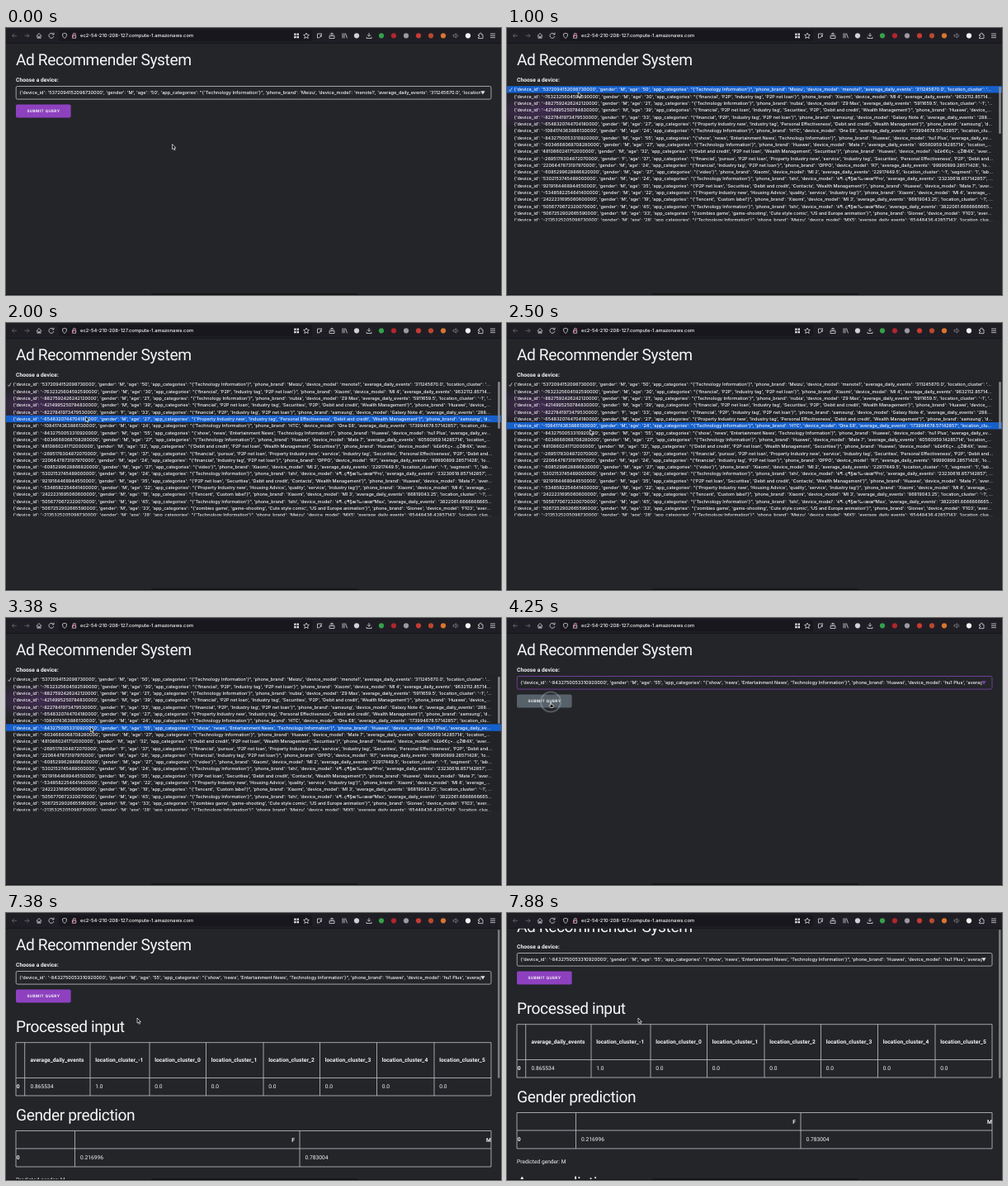
Write an HTML page that moves like this. It is 600 px wide and 323 px high and loops after 8 s.

```html
<!DOCTYPE html>
<html lang="en">
<head>
<meta charset="utf-8">
<title>Ad Recommender System</title>
<style>
  html, body { margin: 0; height: 100%; overflow: hidden; background: #232529; }
  svg { display: block; }
  text { font-family: Roboto, sans-serif; fill: #f6f6f6; text-rendering: geometricPrecision; white-space: pre; }
  .ui { font-family: Inter, sans-serif; font-weight: 500; }
  .h1 { letter-spacing: -.42px; }
  .b { font-weight: 700; letter-spacing: .06px; }
  .btn { font: 700 4.58px Inter, sans-serif; letter-spacing: .42px; }
  .line { fill: none; stroke: #c4c5c8; stroke-width: .8; }
  .icon { fill: none; stroke: #d8d8de; stroke-width: .8; }
</style>
</head>
<body>
<script>
const LOOP = 8000, STEP = 125;
const OPEN = 1000, PICK = 3500, CLICK = 4250, RESULT = 6500;
const ROW_TOP = 70.2, ROW_H = 8.32, PICKED = 7;

// id; gender; age; categories; brand; model; daily events
const devices = `5372094152098730000;M;50;Technology Information;Meizu;menote1;311245670.0
-7632325604592590000;M;30;financial|P2P|Industry tag|P2P net loan;Xiaomi;MI 4;9632112.857142857
-8827592426242120000;M;21;Technology Information;nubia;Z9 Max;5911659.5
-4214995250784830000;M;39;financial|P2P net loan|Industry tag|Securities|P2P|Debit and credit|Wealth Management;Huawei;Mate 7;0.0
-8227841973479530000;F;33;financial|P2P|Industry tag|P2P net loan;samsung;Galaxy Note 4;2882.5
-6548320744704180000;M;27;Property Industry new|Industry tag|Personal Effectiveness|Debit and credit|Wealth Management;samsung;Note 3;0.0
-1084174363886130000;M;24;Technology Information;HTC;One E8;173994678.57142857
-8432750053310920000;M;55;show|news|Entertainment News|Technology Information;Huawei;hu1 Plus;0.0
-6034668068708280000;M;27;Technology Information;Huawei;Mate 7;40560959.14285714
4810860241712000000;M;32;Debit and credit|P2P net loan|Wealth Management|Securities;Huawei;è£è€€ç•…çŽ©4X;0.0
-2695178304872070000;F;37;financial|pursue|P2P net loan|Property Industry new|service|Industry tag|Securities|Personal Effectiveness|P2P|Debit and credit;Huawei;P8;0.0
2206447873197970000;M;24;financial|Industry tag|P2P net loan;OPPO;R7;99990899.28571428
-6085299628866820000;M;27;video;Xiaomi;MI 2;22917449.5
5302153745489000000;M;24;Technology Information;Ishi;é¶..ç¶§æ‰‹æœºPro;23230618.857142857
9219164468944550000;M;35;P2P net loan|Securities|Debit and credit|Contacts|Wealth Management;Huawei;Mate 7;0.0
-5348582254641400000;M;22;Property Industry new|Housing Advice|quality|service|Industry tag;Xiaomi;MI 4;0.0
2422231695060600000;M;19;Tencent|Custom label;Xiaomi;MI 3;86819043.25
5056770672320070000;M;45;Technology Information;Ishi;é¶..ç¶§æ‰‹æœºMax;3822061.6666666665
5067252902665590000;M;33;zombies game|game-shooting|Cute style comic|US and Europe animation;Gionee;F103;0.0
-2135325205098730000;M;28;Technology Information;Meizu;MX5;65448436.42857143`.split('\n').map(line => {
  const [id, gender, age, cats, brand, model, events] = line.split(';');
  const set = cats.split('|').map(c => `'${c}'`).join(', ');
  return `{'device_id': '${id}', 'gender': '${gender}', 'age': '${age}', 'app_categories': "{${set}}", ` +
    `'phone_brand': '${brand}', 'device_model': '${model}', 'average_daily_events': '${events}', ` +
    `'location_cluster': '-1', 'segment': '1', 'label': '1'}`;
});

// y is the middle of the capitals
const text = (x, y, s, size = 6.67, cls = '', more = '') =>
  `<text x="${x}" y="${y + size * .357}" font-size="${size}" class="${cls}" ${more}>${s}</text>`;
const rect = (x, y, w, h, fill, more = '') =>
  `<rect x="${x}" y="${y}" width="${w}" height="${h}" fill="${fill}" ${more}/>`;
const path = (d, more = '') => `<path d="${d}" ${more}/>`;
const dot = (x, y, r, fill) => `<circle cx="${x}" cy="${y}" r="${r}" fill="${fill}"/>`;

const table = (cols, rows) => {
  const [x0, x1] = [cols[0], cols.at(-1)], [y0, y1] = [rows[0], rows.at(-1)];
  return path(rows.map(y => `M${x0} ${y}H${x1}`).join('') + cols.map(x => `M${x} ${y0}V${y1}`).join(''), 'class="line"');
};

const clusterCols = [102, 174, 242.5, 312, 380.5, 449.5, 519];
const results =
  text(12, 136.7, 'Processed input', 19.2, 'h1') +
  table([12, 22.7, ...clusterCols, 588], [156.7, 199.5, 221]) +
  text(29.5, 178, 'average_daily_events', 6.67, 'b') +
  text(12.7, 210, '0', 6.67, 'b') + text(29.5, 210, '0.865534') +
  clusterCols.map((x, i) => text(x + 6.2, 178, `location_cluster_${i - 1}`, 6.67, 'b') +
    text(x + 6.2, 210, i ? '0.0' : '1.0')).join('') +
  text(12, 243.7, 'Gender prediction', 19.2, 'h1') +
  table([12, 83.5, 356, 588], [263.5, 285, 307]) +
  text(350, 274.5, 'F', 6.67, 'b', 'text-anchor="end"') +
  text(588, 274.5, 'M', 6.67, 'b', 'text-anchor="end"') +
  text(12.7, 296, '0', 6.67, 'b') + text(90, 296, '0.216996') + text(362.5, 296, '0.783004') +
  text(12, 322.5, 'Predicted gender: M') +
  text(12, 348, 'Age prediction', 19.2, 'h1');

const toolbar = rect(0, 0, 600, 18.5, '#1f1e25') + rect(0, 18, 600, .6, '#0f0f13') +
  rect(64, 2.5, 307, 13.5, '#18171d', 'rx="1.7"') +
  text(90, 9.4, 'ec2-54-210-208-127.compute-1.amazonaws.com', 5.8, 'ui') +
  path('M13 9.3H7.5m2.5-2.5L7.5 9.3l2.5 2.5M22.5 9.3H28m-2.5-2.5L28 9.3l-2.5 2.5', 'class="icon" opacity=".4"') +
  path('M36.8 9.6L40 6.5l3.2 3.1M38 9v3.3h1.4v-2h1.2v2H42V9' +
    'M57.4 7.5a3 3 0 1 0 .5 2.5M58 5.6v2.3h-2.3' +
    'M71 6.2l2.6 1q0 4-2.6 5.4q-2.6-1.4-2.6-5.4z' +
    'M80.5 9h4.2v3.2h-4.2zM81.3 9V7.6a1.3 1.3 0 0 1 2.6 0V9' +
    'M364 6l1 2.2 2.4.2-1.8 1.6.6 2.5-2.2-1.3-2.2 1.3.6-2.5-1.8-1.6 2.4-.2z' +
    'M377.5 12V7h5.5l-2 2.5h2l-4 2.5z' +
    'M395 6v3.5M392.5 8l2.5-2 2.5 2M392 9.5v3h6v-3z' +
    'M408 6.3v6M410 6.3v6M411.5 6.5l2 5.8' +
    'M440 6v4.2m-2-2l2 2 2-2M437 10.8v1.7h6v-1.7' +
    'M572.5 8h1.5q0-2 1.3-2t1.3 2h1.4v4.6h-5.5v-1.4q1.6 0 1.6-1t-1.6-.9z' +
    'M587 7h6M587 9.3h6M587 11.6h6', 'class="icon"') +
  path('M80 12.6l5-6.4', 'stroke="#e23b55" stroke-width=".9"') +
  path('M349.2 6.4h2.4v2.4h-2.4zM352.6 6.4h2.4v2.4h-2.4zM349.2 9.8h2.4v2.4h-2.4zM352.6 9.8h2.4v2.4h-2.4z', 'fill="#e4e4e8"') +
  path('M542 8.3h1.5l2-1.7v5.4l-2-1.7H542zM547 7.5q1.4 1.8 0 3.6', 'class="icon" opacity=".5"') +
  [[425, '#d0d0d6'], [455, '#35a04a'], [470, '#b0262c'], [485, '#9a9aa0'], [500, '#c63a32'],
   [515, '#b8492f'], [530, '#d9752f'], [560, '#f4f4f4']].map(([x, c]) => dot(x, 9.3, 3.1, c)).join('');

document.body.innerHTML = `<svg width="600" height="323" viewBox="0 0 600 323">
  <defs><radialGradient id="glow"><stop stop-color="#7a3aa0" stop-opacity=".35"/><stop offset="1" stop-color="#7a3aa0" stop-opacity="0"/></radialGradient></defs>
  ${rect(0, 0, 600, 323, '#232529')}
  <g id="page">
    ${text(12, 37.7, 'Ad Recommender System', 19.2, 'h1')}
    ${text(12, 63, 'Choose a device:', 6.67, 'b')}
    ${rect(12.2, 70.5, 575.8, 15.6, 'none', 'id="box" stroke-width=".8" rx="1.7"')}
    <svg x="12" y="70" width="563.5" height="16">${text(4.2, 8.2, '', 5.57, 'ui', 'id="value"')}</svg>
    ${path('M575.4 76.2h5.2l-2.6 4.2z', 'id="arrow"')}
    ${rect(12, 92.6, 66.6, 15.9, '', 'id="button" rx="1.7"')}
    ${text(45.4, 100.6, 'SUBMIT QUERY', 4.58, 'btn', 'text-anchor="middle"')}
    <g id="results">${results}</g>
  </g>
  ${rect(596, 20, 2.6, 180, '#77787c', 'id="thumb" rx="1.3"')}
  ${rect(0, 322, 600, 1, '#17181b')}${rect(176, 321.4, 250, 1.6, '#101113')}
  ${toolbar}
  <svg id="menu" y="68.5" width="600" height="165" viewBox="0 68.5 600 165">
    ${rect(0, 68.5, 600, 165, '#222327')}
    <ellipse cx="38" cy="100" rx="75" ry="22" fill="url(#glow)"/>
    ${rect(0, 0, 600, ROW_H, '#1660cc', 'id="mark"')}
    ${path('M2.4 74.8l1.3 1.7 2.4-4', 'class="icon"')}
    ${devices.map((d, i) => text(8.5, ROW_TOP + ROW_H * (i + .5), d, 5.45, 'ui row')).join('')}
    ${rect(596.3, 71, 2.4, 57, '#8a8b8e', 'rx="1.2"')}
  </svg>
  <circle id="ring" r="12" fill="none" stroke="#b4bac0" stroke-opacity=".35" stroke-width="2"/>
  <g id="cursor" stroke="#f4f4f4" stroke-width=".7" fill="#111">
    ${path('M0 0V6.2L1.4 5L2.4 7.3L3.5 6.8L2.5 4.6H4.4z', 'id="pointer"')}
    ${path('M-.6 .4q.6-.8 1.2 0V3l2.3.6q.6.4.3 1.6L2.6 7H-.4L-2 4.6q0-.9 1.4 0z', 'id="hand"')}
  </g>
</svg>`;

const $ = id => document.getElementById(id);
const set = (id, attrs) => { for (const k in attrs) $(id).setAttribute(k, attrs[k]); };
const show = (id, on) => set(id, { visibility: on ? 'visible' : 'hidden' });

// Long options end in an ellipsis
for (const row of document.querySelectorAll('.row')) {
  let s = row.textContent;
  while (row.getComputedTextLength() > 581) row.textContent = (s = s.slice(0, -1)) + '...';
}

// time, x, y
const track = [[0, 201.5, 140.5], [880, 86, 77.5], [1250, 87, 77.8], [1375, 88, 80], [1625, 95, 112],
  [2000, 96.5, 113], [2630, 101, 131], [3500, 102.5, 131.5], [4125, 53, 101.5], [4375, 53, 101.5],
  [5500, 229, 140.5], [6500, 229, 140.5], [7250, 159, 127], [LOOP, 159, 127]];

function cursorAt(t) {
  const i = Math.max(1, track.findIndex(k => k[0] >= t));
  const [t0, x0, y0] = track[i - 1], [t1, x1, y1] = track[i];
  const u = (t - t0) / (t1 - t0), e = u * u * (3 - 2 * u);
  return [x0 + (x1 - x0) * e, y0 + (y1 - y0) * e];
}

function draw(now) {
  const t = Math.floor(now % LOOP / STEP) * STEP;
  const [x, y] = cursorAt(t);
  const focused = t >= OPEN - STEP && t <= CLICK;
  const loaded = t >= RESULT;
  const scroll = 22 * (Math.max(0, t - 7500) / 375) ** 2;
  // the highlight trails the pointer by one step
  const pointed = cursorAt(Math.max(OPEN, t - STEP))[1];
  const hovered = Math.max(0, Math.floor((pointed - ROW_TOP) / ROW_H));
  const overButton = t > 4000 && t < 4600;

  set('page', { transform: `translate(0 ${-scroll})` });
  set('box', { stroke: focused ? '#8444b0' : '#c4c5c8' });
  set('arrow', { fill: focused ? '#8444b0' : '#e0e0e2' });
  set('button', { fill: t >= 4000 && !loaded ? '#56616a' : '#8d41bf' });
  $('value').textContent = devices[t >= PICK ? PICKED : 0];
  show('results', loaded);
  show('thumb', loaded);
  show('menu', t >= OPEN && t < PICK);
  set('mark', { y: ROW_TOP + ROW_H * hovered });
  set('ring', { cx: x, cy: y });
  show('ring', t >= CLICK && t < CLICK + 200);
  set('cursor', { transform: `translate(${x} ${y})` });
  show('hand', overButton);
  show('pointer', !overButton);
}

const start = performance.now();
function tick() {
  draw(performance.now() - start);
  requestAnimationFrame(tick);
}
tick();
</script>
</body>
</html>
```
